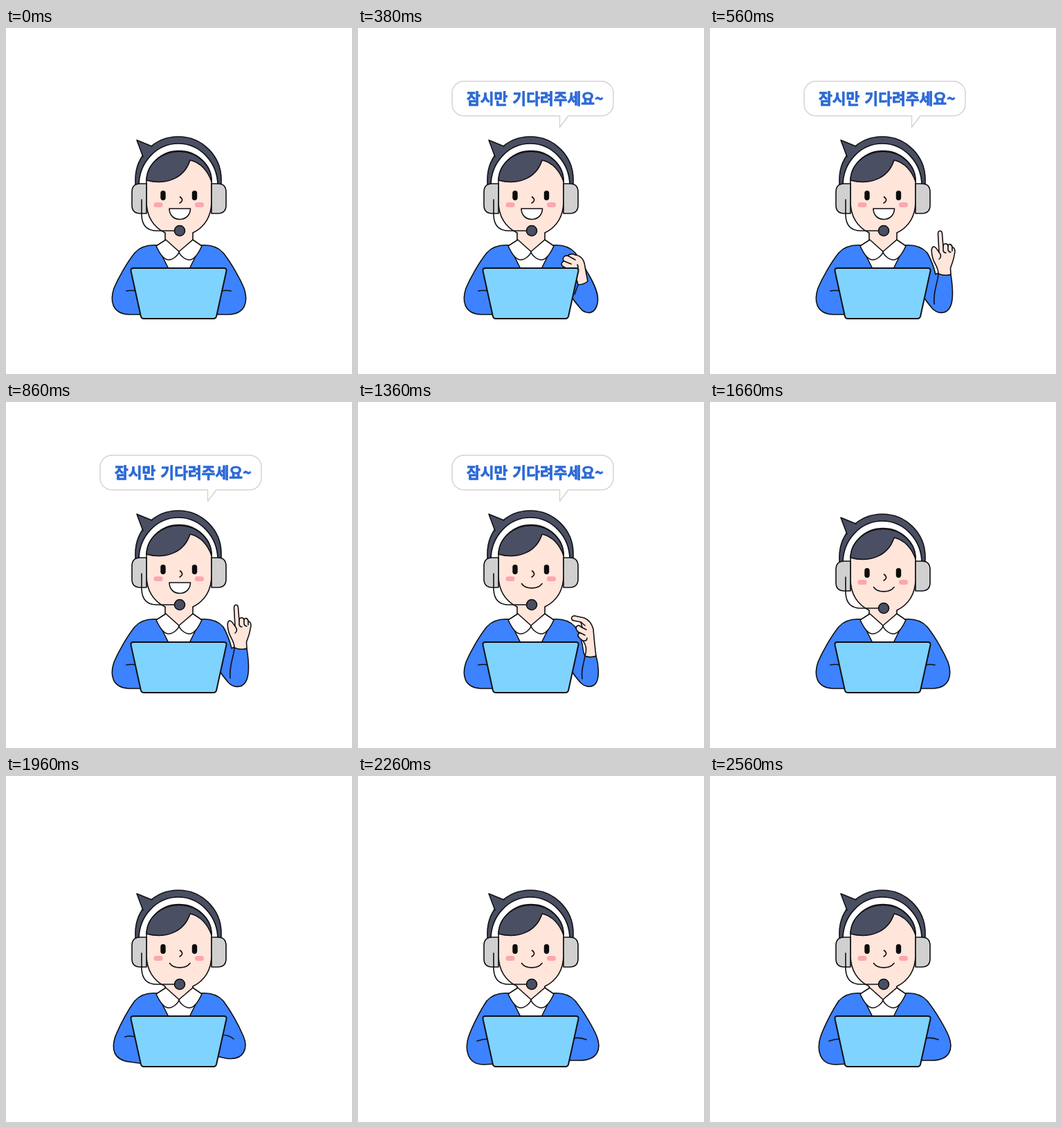
Animation of 500 by 500 pixels, one loop 2.66 s. Source, as an HTML page:

```html
<!DOCTYPE html>
<html lang="ko">
<head>
<meta charset="utf-8">
<title>Help desk agent</title>
<style>
  html, body { margin: 0; width: 100%; height: 100%; overflow: hidden; background: #fff; }
  svg { display: block; width: 100vw; height: 100vh; }
  .line { fill: none; }
  .plain { stroke: none; }
  .skin { fill: #ffe5da; }
  .hair { fill: #4a4f63; }
  .white { fill: #fff; }
  .cloth { fill: #3d82ff; }
  .pad { fill: #d0d0d0; }
  .cheek { fill: #fba6ae; stroke: none; }
  .eye { fill: #0c0c0c; stroke: none; }
  .bubble path { fill: #fff; stroke: #d4d4d4; stroke-width: 1.5; }
  .bubble text {
    fill: #2d6ad6; stroke: #2d6ad6; stroke-width: .8; word-spacing: 1px;
    font: 900 21.5px "Noto Sans CJK KR", "Noto Sans CJK", sans-serif;
  }
</style>
</head>
<body>
<svg viewBox="0 0 500 500" stroke="#101014" stroke-width="1.6" stroke-linecap="round" stroke-linejoin="round">
  <g class="bubble" id="bubble">
    <path d="M153 77H352A17 17 0 0 1 369 94V110A17 17 0 0 1 352 127H304L291.500 143.500V127H153A17 17 0 0 1 136 110V94A17 17 0 0 1 153 77Z"/>
    <text x="157" y="109.500">잠시만 기다려주세요~</text>
  </g>

  <!-- neck and shirt -->
  <path class="skin" d="M230 285V306L250 324L270 306V285"/>
  <path class="white plain" d="M218 314L250 322L282 314L265 350H235Z"/>

  <!-- jacket -->
  <path class="cloth plain" d="M218 314L235 348V400H205L196 335Z"/>
  <path class="cloth plain" d="M282 314L265 348V400H300L304 335Z"/>
  <path class="cloth" id="leftSleeve"/>
  <path class="line" id="leftCrease"/>
  <path class="cloth" id="rightSleeve"/>
  <path class="line" id="rightCrease"/>
  <g id="hand">
    <path class="skin" id="palm"/>
    <path class="line" id="fingers"/>
  </g>
  <path class="line" d="M218 314L235 348M282 314L265 348"/>

  <!-- collar -->
  <path class="white" d="M231 306L217 315C222 326 228 335 235 335C242 335 250 327 250 323Z"/>
  <path class="white" d="M270 306L283 315C278 326 272 335 265 335C258 335 250 327 250 323Z"/>

  <g id="head">
    <path class="hair" d="M187 226V219A62 62 0 0 1 311 219V226Z"/>
    <path class="hair" d="M198 186L189 162L211 171"/>
    <path class="white" d="M192 228A57 61 0 0 1 306 228Z"/>
    <path class="skin" d="M230 296C213 288 203 272 203 251V222A47 44.500 0 0 1 297 222V251C297 272 287 288 270 296"/>
    <path class="hair" d="M203 220A47 42.500 0 0 1 297 222C292 207 281 194 266 191C257 219 229 227 203 220Z"/>
    <path class="pad" d="M203 225V268H194Q182 268 182 256V237Q182 225 194 225Z"/>
    <path class="pad" d="M297 225V268H306Q318 268 318 256V237Q318 225 306 225Z"/>
    <rect class="eye" x="223.300" y="235" width="7.400" height="14" rx="3.700"/>
    <rect class="eye" x="268.800" y="235" width="7.400" height="14" rx="3.700"/>
    <rect class="cheek" x="213.500" y="252" width="13" height="7" rx="3.500"/>
    <rect class="cheek" x="273" y="252" width="13" height="7" rx="3.500"/>
    <path class="line" d="M251.500 244Q258 249 251 253"/>
    <path class="white" id="openMouth" d="M236 261H266.500C266.500 270 260 276.500 251 276.500S236 270 236 261Z"/>
    <path class="line" id="smile" d="M236.500 262.500C242 271 260 271 266 262.500"/>
    <path class="line" d="M196 248V271Q197 293 218 293H244"/>
    <circle class="hair" cx="251" cy="293" r="7.500"/>
  </g>

  <path fill="#7fd3ff" stroke-width="2" d="M184 347H315Q319 347 318.500 351L304 417Q303 420 300 420H199Q196 420 195 417L180.500 351Q180 347 184 347Z"/>
</svg>
<script>
  const LOOP = 2660;
  const byId = id => document.getElementById(id);

  // Outlines shared by several poses
  const leftShoulder = "M218 314C205 313 194 316 186 325";
  const rightShoulder = "M282 314C295 313 306 316 314 325";
  const elbow = "C316 399 312 394 309 389";

  // Each entry: sleeve outline, crease
  const left = {
    rest: [leftShoulder + "C174 340 162 362 156 376C150 394 153 413 178 414H200", "M174 380Q181 378.500 189 380"],
    up: [leftShoulder + "C175 340 164 362 158 376C152 394 155 410 178 413L200 416", "M172 377Q180 374 189 378"],
    down: [leftShoulder + "C176 340 165 362 160 376C154 394 157 417 182 417L200 416", "M172 383Q180 380 189 380"]
  };

  const right = {
    rest: [rightShoulder + "C326 340 338 362 344 376C350 394 347 413 322 414H300", "M311 380Q318 378.500 325 380"],
    up: [rightShoulder + "C325 340 337 362 343 376C350 392 345 412 318 408L300 404", "M311 374Q322 374 329 380"],
    down: [rightShoulder + "C326 340 339 362 345 376C352 394 347 411 320 411H300", "M310 379Q321 377 330 381"],
    curl: [rightShoulder + "C320 333 328 346 332 354C341 369 349 385 346 398C343 413 332 414 324 408" + elbow, "M318 371L313 385"],
    half: [rightShoulder + "C319 332 324 345 326 362L328 367Q336 370 344 367C348 380 349 398 344 406C338 414 328 412 321 405" + elbow, "M328 367C326 380 322 386 324 400"],
    point: [rightShoulder + "C319 334 323 343 326 356L330 354Q339 359 348 356C351 375 352 396 346 405C340 414 328 413 321 405" + elbow, "M330 355C329 370 322 381 324 399"],
    high: ["M282 314C294 313 304 315 312 322L324 328L328 321Q337 325 346 322C349 341 352 362 346 372C340 382 330 384 321 389L309 395", "M328 321C327 335 320 345 322 358"]
  };

  // Each entry: outline, finger lines
  const hands = {
    curl: ["M318 371C316 362 314 357 310 352L297 345C293 343 293 338 298 337C294 333 298 328 303 329C306 326 311 326 314 328C322 329 327 335 328 345L332 366Q326 371 318 371Z",
      "M298 337L308 341M303 329L314 335M307 350C316 352 320 347 317 342"],
    half: ["M328 367C331 358 330 351 325 345L320 341C316 338 318 333 322 334C315 332 313 325 318 323C320 322 322 325 324 326L322 318L312 316C307 315 308 309 313 309L327 312C334 315 338 321 340 328C341 340 342 352 344 367Q336 370 328 367Z",
      "M322 318L328 323M324 326L330 329M322 334L328 337M325 345Q331 346 331 341"],
    point: ["M330 355C330 346 324 340 322 333C320 326 319 317 323 316C327 316 328 321 331 324L329.500 297C330 292 335 292 335.500 297L337 316C337 311 343 310 344 315C344 311 350 312 350 317C354 317 355 323 353 328C352 336 349 342 347.500 347L348 356Q339 359 330 355Z",
      "M337 316V322Q338 325 341 325M344 315V321Q345 324 348 324M350 317V322M331 324Q336 330 331 334"]
  };

  // name: [left arm, right arm, hand, hand shift]
  const poses = {
    rest: ["rest", "rest"],
    tapUp: ["up", "up"],
    tapDown: ["down", "down"],
    lift: ["rest", "curl", "curl", [-3, 14]],
    curl: ["rest", "curl", "curl"],
    half: ["rest", "half", "half"],
    point: ["rest", "point", "point"],
    high: ["up", "high", "point", [-2, -34]]
  };

  // start in ms, pose, head drop, mouth open, bubble shown
  const steps = [
    [0, "rest", 0, 1, 0], [100, "tapUp", 0, 1, 0], [200, "rest", 0, 1, 0],
    [250, "rest", 0, 1, 1], [300, "lift", 0, 1, 1], [380, "curl", 0, 1, 1],
    [460, "half", 0, 1, 1], [560, "point", 0, 1, 1], [710, "high", 0, 1, 1],
    [860, "point", 0, 1, 1], [1010, "high", 0, 1, 1], [1160, "high", 0, 0, 1],
    [1360, "half", 0, 0, 1], [1410, "curl", 0, 0, 1], [1460, "lift", 0, 0, 1],
    [1510, "rest", 0, 0, 0], [1560, "rest", 2, 0, 0], [1660, "rest", 5, 0, 0],
    [1760, "tapDown", 7, 0, 0], [1860, "rest", 8, 0, 0], [1960, "tapUp", 8, 0, 0],
    [2060, "tapDown", 8, 0, 0], [2160, "tapUp", 8, 0, 0], [2260, "tapDown", 8, 0, 0],
    [2360, "tapUp", 8, 0, 0], [2460, "rest", 8, 0, 0], [2560, "tapDown", 8, 0, 0]
  ];

  const show = (id, on) => byId(id).setAttribute("visibility", on ? "visible" : "hidden");
  const trace = (ids, shapes) => ids.forEach((id, i) => byId(id).setAttribute("d", shapes[i]));
  const move = (id, x, y) => byId(id).setAttribute("transform", `translate(${x} ${y})`);

  function apply([, name, drop, open, bubble]) {
    const [leftArm, rightArm, hand, shift = [0, 0]] = poses[name];
    trace(["leftSleeve", "leftCrease"], left[leftArm]);
    trace(["rightSleeve", "rightCrease"], right[rightArm]);
    if (hand) trace(["palm", "fingers"], hands[hand]);
    show("hand", hand);
    move("hand", ...shift);
    move("head", 0, drop);
    show("openMouth", open);
    show("smile", !open);
    show("bubble", bubble);
  }

  const start = performance.now();
  let current;

  function draw() {
    const t = (performance.now() - start) % LOOP;
    const step = steps.findLast(s => s[0] <= t);
    if (step !== current) apply(current = step);
    requestAnimationFrame(draw);
  }
  draw();
</script>
</body>
</html>
```
